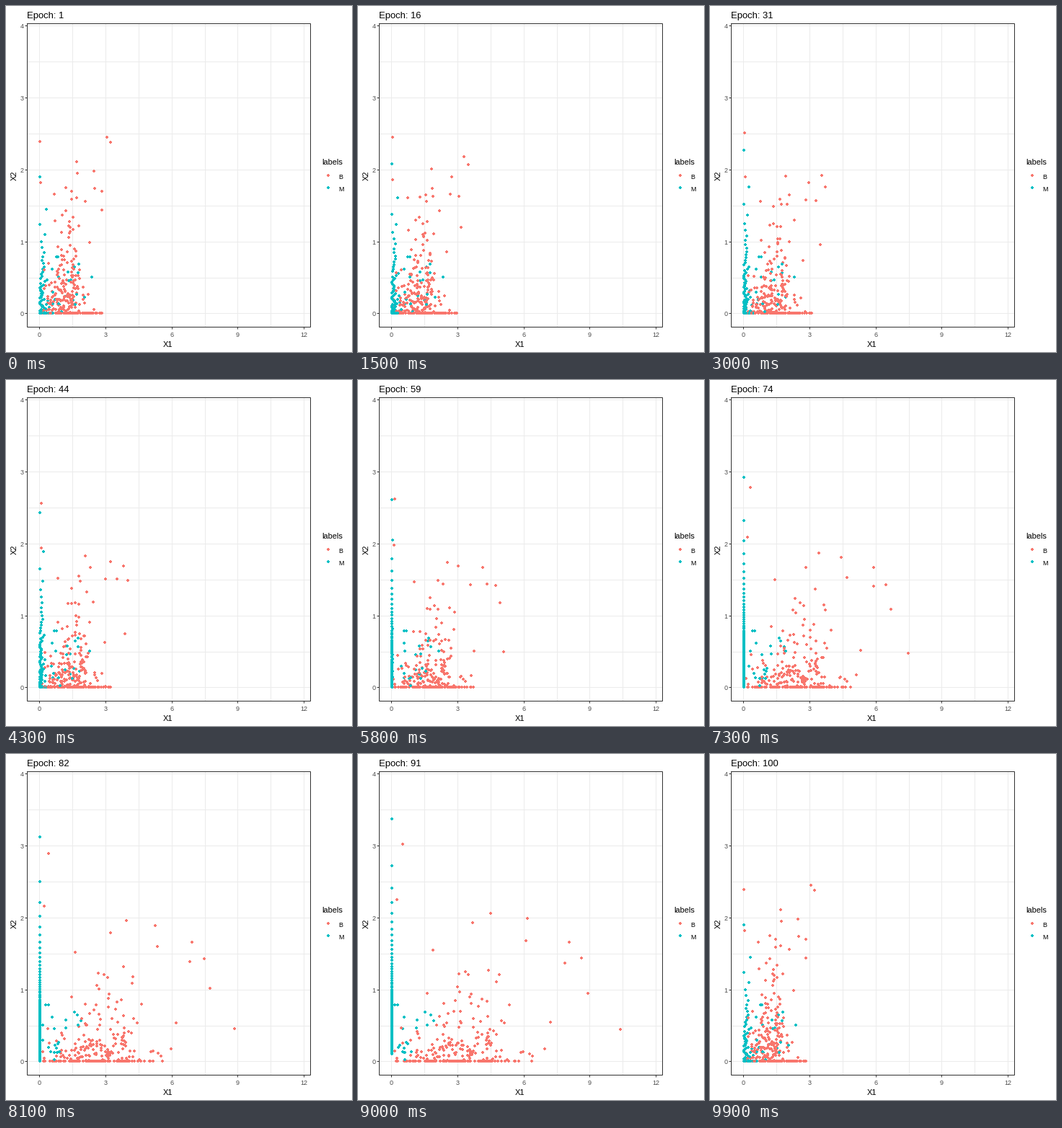
Animation of 480 by 480 pixels, one loop 10 s. Source, as a matplotlib script:

```python
import numpy as np
import matplotlib.pyplot as plt
from matplotlib.animation import FuncAnimation

SIZE, FRAMES, STEP = 480, 100, 100
X0, Y0, DX, DY = 46.4, 426.4, 30.55, 99.75
LEFT, RIGHT, TOP, BOTTOM = 29, 422, 24, 445
CORAL, TEAL = "#F8766D", "#00BFC4"
GRID, DARK, TICK = "#EBEBEB", "#333333", "#4D4D4D"
TURN, LATE = 58, 81  # epochs that the middle and late poses belong to

plt.rcParams["font.family"] = "Liberation Sans"
rng = np.random.default_rng(12)

# Leading points: x start, x late, height start, height middle, height late
LEADERS = np.array([
    (3.06, 7.60, 2.45, 1.42, 1.43), (3.22, 7.87, 2.38, 1.18, 1.02),
    (2.83, 9.02, 1.44, 0.50, 0.46), (2.83, 6.95, 1.70, 1.44, 1.39),
    (2.50, 5.45, 1.74, 1.43, 1.60), (2.47, 7.05, 1.98, 1.67, 1.66),
    (1.69, 5.35, 1.61, 1.69, 1.89), (0.01, 0.40, 2.39, 2.62, 2.89),
    (0.67, 1.65, 1.66, 1.47, 1.52), (0.05, 0.21, 1.82, 1.98, 2.16),
])


def benign_cloud(n):
    x = np.clip(rng.normal(1.15, 0.5, n), 0.05, 2.6)
    h = rng.gamma(1.1, 0.4, n) * np.clip(0.35 + 0.5 * x, 0.5, 1.3)
    mid = np.maximum(0, h * rng.uniform(0.55, 0.95, n) - 0.05)
    late = mid * rng.uniform(0.9, 1.2, n)
    return np.column_stack([x, x * rng.uniform(2, 2.8, n), h, mid, late])


def benign_row(n):
    x = np.clip(rng.normal(1.4, 0.65, n), 0.1, 2.83)
    zero = np.zeros(n)
    return np.column_stack([x, 1.85 * x, zero, zero, zero])


def malignant_column(n):
    # Evenly spaced quantiles of an exponential spread
    h = -0.57 * np.log((np.arange(n) + 0.5) / n)
    x = rng.exponential(0.12, n)
    return np.column_stack([x, -1.5 * x, 0.72 * h - 0.35, 0.9 * h - 0.2, h])


def malignant_strays(n):
    x = rng.uniform(0.3, 2.5, n)
    h = rng.uniform(0, 0.8, n)
    return np.column_stack([x, x * rng.uniform(0.1, 1.1, n), h, h, h])


benign = np.vstack([LEADERS, benign_cloud(175), benign_row(110)])
malignant = np.vstack([malignant_column(120), malignant_strays(22)])
points = np.vstack([benign, malignant])
colors = np.array([CORAL] * len(benign) + [TEAL] * len(malignant))
order = rng.permutation(len(points))
points, colors = points[order], colors[order]
xa, xb, ha, hm, hb = points.T


def positions(t):
    # Slow drift that bends into a fast steady spread
    spread = 0.0035 * t + 0.0245 * 5 * np.log1p(np.exp((t - 53) / 5))
    early = min(1, t / TURN)
    late = max(0, (t - TURN) / (LATE - TURN)) ** 1.2
    x = np.maximum(0, xa + (xb - xa) * spread)
    h = np.maximum(0, ha + (hm - ha) * early + (hb - hm) * late)
    return np.rint(np.column_stack([X0 + 0.3 + DX * x, Y0 - DY * h]))


fig = plt.figure(figsize=(SIZE / 72, SIZE / 72), dpi=72, facecolor="white")
ax = fig.add_axes([0, 0, 1, 1])
ax.set(xlim=(0, SIZE), ylim=(SIZE, 0))
ax.axis("off")


def line(xs, ys, color, z):
    ax.plot(xs, ys, color=color, lw=1, zorder=z, solid_capstyle="butt",
            solid_joinstyle="miter")


def label(x, y, s, size, color="black", **kw):
    return ax.text(x, y, s, fontsize=size, color=color, **kw)


def dots(xy, c):
    # Without antialiasing this size fills a 4 px disc
    return ax.scatter(*np.transpose(xy), s=2.75 ** 2, c=c, linewidths=0,
                      antialiased=False, zorder=3)


for i in range(9):
    x = round(X0 + 1.5 * i * DX)
    y = round(Y0 - 0.5 * i * DY)
    line([x, x], [TOP, BOTTOM], GRID, 1)
    line([LEFT, RIGHT], [y, y], GRID, 1)
    if i % 2 == 0:
        line([x, x], [BOTTOM, BOTTOM + 3], DARK, 2)
        line([LEFT - 3, LEFT], [y, y], DARK, 2)
        label(x + 0.5, 459, str(3 * i // 2), 9, TICK, ha="center")
        label(24.5, y + 4, str(i // 2), 9, TICK, ha="right")

line([LEFT, RIGHT, RIGHT, LEFT, LEFT], [TOP, TOP, BOTTOM, BOTTOM, TOP], DARK, 4)

label(224.5, 473, "X1", 11, ha="center")
label(12, 235.5, "X2", 11, ha="center", va="center", rotation=90)
label(438.5, 220, "labels", 11)
label(461.5, 240, "B", 9)
label(461.5, 257, "M", 9)
dots([(447, 235), (447, 252)], [CORAL, TEAL])

title = label(29, 17, "", 13)
cloud = dots(positions(0), colors)


def update(frame):
    # The last epoch already shows the opening layout again
    cloud.set_offsets(positions(frame % (FRAMES - 1)))
    title.set_text(f"Epoch: {frame + 1}")
    return cloud, title


anim = FuncAnimation(fig, update, frames=FRAMES, interval=STEP,
                     repeat=True, repeat_delay=0, blit=False)
plt.show()
```
